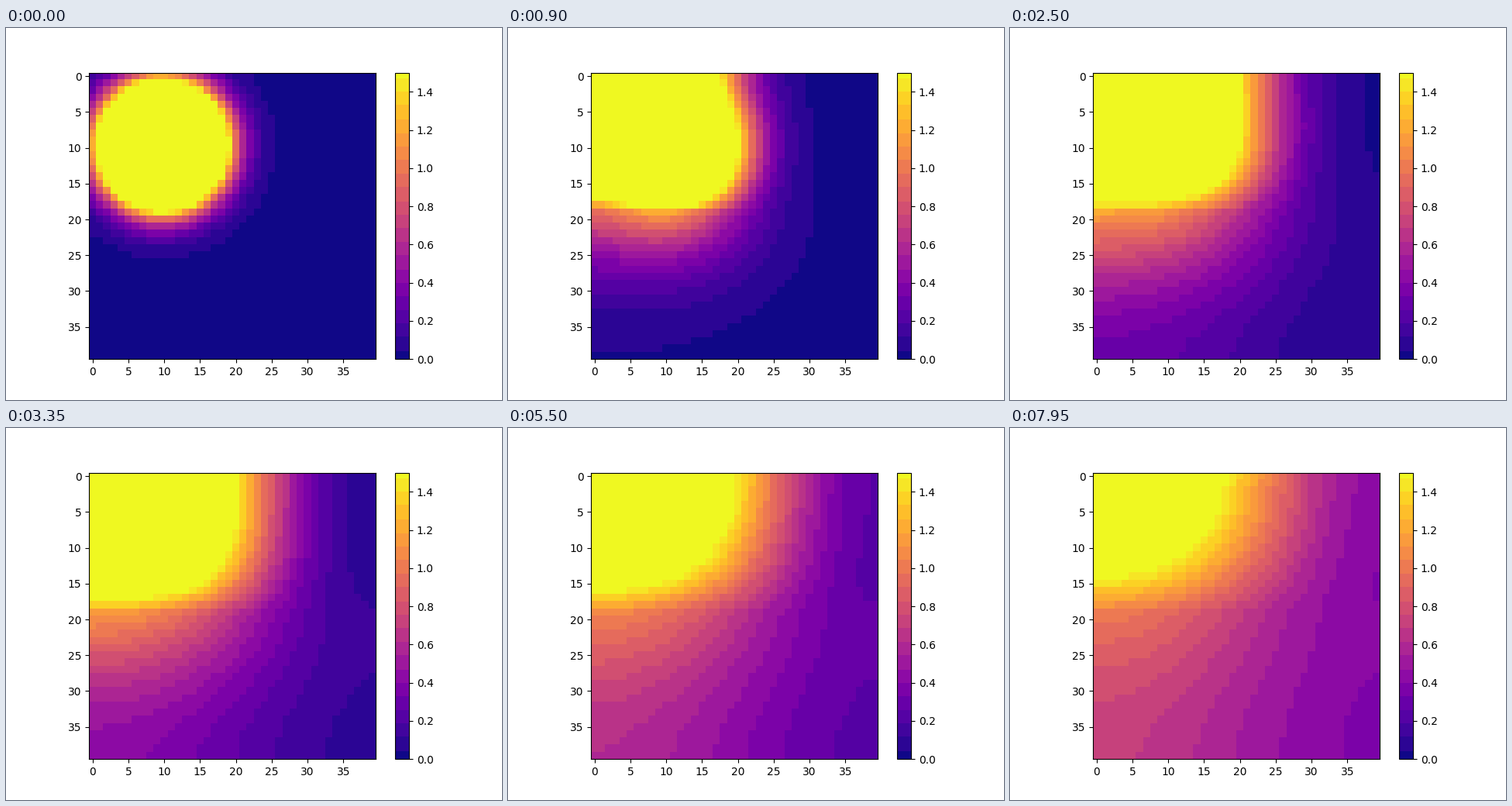
A matplotlib script for the animation above (8000 ms loop, 640 px wide and 480 px high).

```python
import numpy as np
import matplotlib.pyplot as plt
from matplotlib.animation import FuncAnimation
from matplotlib.colors import ListedColormap

N = 40
FRAMES = 160
SUBSTEPS = 16
VMAX = 1.5
CENTER, PEAK, SPREAD = 9.75, 10, 45
LAYER = 19            # first row of the fast-conducting layer
D_SLOW, D_FAST = 0.63, 2.1


def banded_plasma(first=0.043, width=0.0714):
    """Plasma reduced to equal flat bands after a narrow first one."""
    levels = (np.arange(256) + 0.5) / 256 * VMAX
    band = np.floor((levels - first) / width)
    mids = first + (band + 0.5) * width
    return ListedColormap(plt.get_cmap("plasma")(np.clip(mids / VMAX, 0, 1)))


def simulate():
    """Heat spreading through two layers with insulated walls."""
    y, x = np.mgrid[:N, :N]
    u = PEAK * np.exp(-((x - CENTER) ** 2 + (y - CENTER) ** 2) / SPREAD)
    d = np.where(np.arange(N) < LAYER, D_SLOW, D_FAST)[:, None] / SUBSTEPS
    states = [u.copy()]
    for _ in range(FRAMES - 1):
        for _ in range(SUBSTEPS):
            fx = d * np.diff(u, axis=1)
            fy = d[:-1] * np.diff(u, axis=0)
            u[:, :-1] += fx
            u[:, 1:] -= fx
            u[:-1] += fy
            u[1:] -= fy
        states.append(u.copy())
    return states


states = simulate()
fig, ax = plt.subplots(figsize=(6.4, 4.8), dpi=100)
image = ax.imshow(states[0], cmap=banded_plasma(), vmin=0, vmax=VMAX,
                  interpolation="nearest")
fig.colorbar(image, ax=ax)


def update(i):
    image.set_data(states[i])
    return [image]


anim = FuncAnimation(fig, update, frames=FRAMES, interval=50, repeat=True)
plt.show()
```
